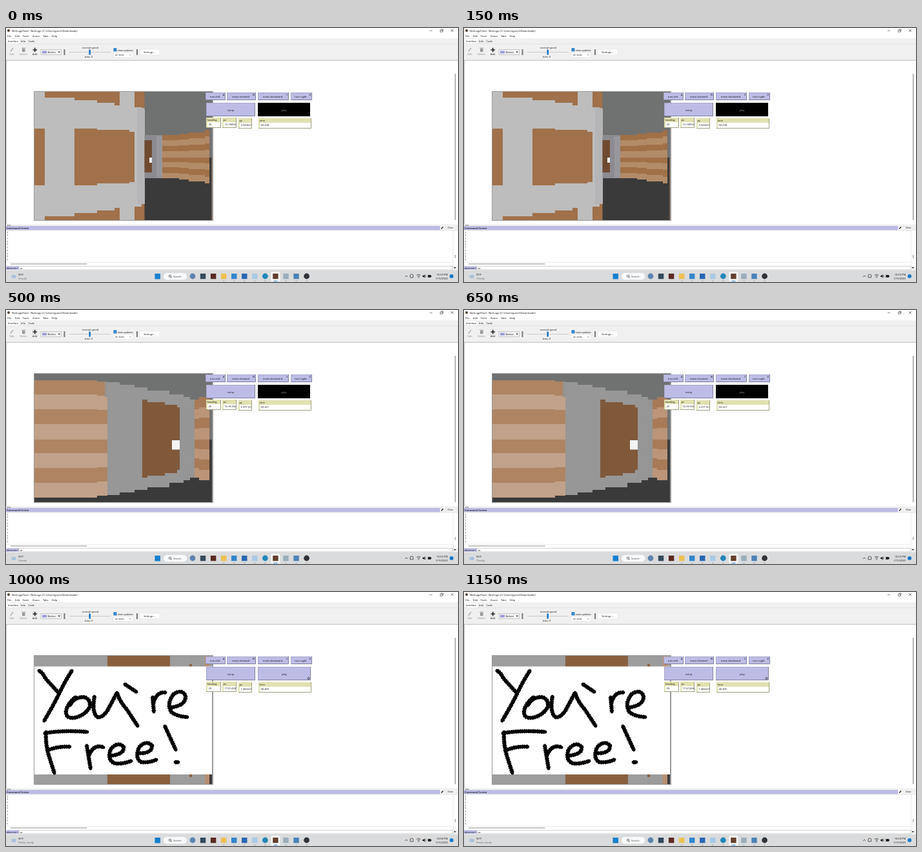
These frames come from a looping animation (700 px wide and 394 px high, 1250 ms). An HTML page:

```html
<!DOCTYPE html>
<html lang="en">
<head>
<meta charset="utf-8">
<title>Maze walk</title>
<style>
html, body { margin: 0; width: 100%; height: 100%; overflow: hidden; background: #fff; }
svg { display: block; width: 700px; height: 394px; font-family: "Open Sans", "Noto Sans", sans-serif; }
text { white-space: pre; }
</style>
</head>
<body>
<svg id="stage" viewBox="0 0 700 394" xmlns="http://www.w3.org/2000/svg">
  <defs>
    <clipPath id="view"><rect x="44" y="99" width="275" height="199"/></clipPath>
    <pattern id="grain" width="3" height="3" patternUnits="userSpaceOnUse">
      <path d="M0 .5h1M2 2.5h1" stroke="#707070" opacity=".2"/>
    </pattern>
  </defs>
  <g id="chrome"></g>
  <g id="frame"></g>
  <g id="world" clip-path="url(#view)"></g>
  <g id="widgets"></g>
  <g id="status"></g>
</svg>
<script>
const STEP = 250;
const HORIZON = 199.5;
const LAVENDER = '#bcbce6';
const CRISP = 'shape-rendering="crispEdges"';
const MID = 'text-anchor="middle"';
const END = 'text-anchor="end"';
const layer = id => document.getElementById(id);

const rect = (x, y, x2, y2, fill, extra = '') =>
  `<rect x="${x}" y="${y}" width="${x2 - x}" height="${y2 - y}" fill="${fill}" ${extra}/>`;
const line = (d, color = '#222', width = 0.7, extra = '') =>
  `<path d="${d}" fill="none" stroke="${color}" stroke-width="${width}" ${extra}/>`;
const dot = (x, y, r, fill) => `<circle cx="${x}" cy="${y}" r="${r}" fill="${fill}"/>`;
const label = (x, y, text, size = 4.1, fill = '#111', extra = '') =>
  `<text x="${x}" y="${y}" font-size="${size}" fill="${fill}" ${extra}>${text}</text>`;

// spans: x, half height, x, half height, ..., end x. Two colours make eight stripes.
function wall(spans, ...colors) {
  const rows = colors.length > 1 ? 8 : 1;
  let out = '';
  for (let i = 0; i + 2 < spans.length; i += 2) {
    const [x, half, end] = spans.slice(i, i + 3);
    const edge = k => rows === 8 && k === 4 ? HORIZON + 1.5 : HORIZON + half * (2 * k / rows - 1);
    for (let k = 0; k < rows; k++) {
      out += rect(x, edge(k), end, edge(k + 1), colors[k % colors.length], CRISP);
    }
  }
  return out;
}

const room = rect(44, 99, 319, 201, '#707171') + rect(44, 201, 319, 299, '#3a3a3a');

function corridor() {
  const wood = '#a0714a', stone = '#bdbdbd';
  return room
    + rect(44, 99, 214.5, 298, wood)
    + wall([44, 101, 60, 92, 106, 87.5, 141, 83.5, 168, 79.5, 176, 101, 199, 77, 210, 73, 214.5], stone)
    + rect(203, 124, 214.5, 273, '#b5b5b7')
    + wall([44, 44, 60], wood)
    + wall([106, 44, 141, 41.5, 191, 39, 199], wood)
    + rect(214.5, 166, 242, 233, '#8b8b91') + rect(233, 168, 242, 232, '#97979c')
    + rect(214.5, 174, 226, 224, '#704a30') + rect(222, 201, 226, 209, '#f2f2f2')
    + wall([242, 33.5, 268, 35.5, 283, 38, 308, 41.5, 315], '#a07047', '#b28b68')
    + rect(318, 201, 319, 298, '#77533f');
}

function hall() {
  return room
    + wall([44, 48, 79, 45, 149], '#a27149', '#ba9272')
    + wall([149, 44, 160, 41.5, 172, 39, 200, 36.5, 226], '#8d8d8d')
    + rect(149, 158, 168, 240, 'url(#grain)')
    + rect(168, 166, 172, 232, '#624422')
    + rect(172, 170, 207, 229, '#744c2e', 'stroke="#6f5a25" stroke-width=".5"')
    + rect(198.5, 201, 207, 209, '#e8e5e2')
    + wall([226, 36.5, 241, 38, 258, 41, 271, 44, 296, 47.5, 315], '#a47148', '#b58c69');
}

function approach() {
  return room
    + wall([44, 91, 141, 88.5, 157], '#ae8462', '#c1a189')
    + rect(153, 111, 157, 135, '#96938f')
    + wall([157, 87.5, 176, 83.5, 199, 79.5, 219, 75, 253, 68.5, 275, 64.5, 285, 60.5, 292], '#979797')
    + rect(269, 137, 292, 262, 'url(#grain)')
    + wall([211, 60.5, 219, 57, 246, 53, 265, 48.5, 269], '#80593a')
    + rect(257, 202, 269, 216.5, '#f3f3f3')
    + wall([292, 60.5, 299, 64.5, 315], '#a87a57', '#bc9578');
}

function doorway() {
  return room
    + rect(44, 99, 134, 200, '#c7ab96') + rect(44, 200, 134, 298, '#b38e6d')
    + wall([44, 83, 134], '#c7ab96')
    + rect(44, 116.5, 134, 158.5, '#b38e6d') + rect(44, 201, 134, 240.5, '#b38e6d')
    + rect(134, 99, 242, 298, '#89603f')
    + rect(222, 201, 242, 232.5, '#050305')
    + rect(242, 99, 315, 298, '#9d9d9d')
    + rect(284, 99, 315, 298, 'url(#grain)')
    + wall([284, 83, 292, 79.5, 304, 75.5, 315], '#895f3e');
}

const lettering = [
  'M51 122Q57 125 61 134L82 157', 'M102 122Q91 139 83 156T59 200',
  'M108 163Q96 172 93 184Q92 197 106 195Q122 192 130 178Q131 165 120 163Q105 163 99 176',
  'M137 162Q133 184 140 193Q147 198 157 184L172 156Q176 170 187 182L204 208',
  'M184 143L202 155', 'M227 163L229 186M228 173Q233 154 247 156',
  'M256 179Q279 176 278 161Q273 150 260 158Q248 173 256 186Q264 193 281 194',
  'M62 217Q61 238 67 256L75 281', 'M60 219Q88 214 126 217', 'M64 246Q79 239 99 240',
  'M125 238L131 274M128 254Q136 235 151 241',
  'M161 254Q184 252 182 240Q173 231 162 244Q156 261 169 266Q181 267 194 262',
  'M204 250Q227 251 226 238Q217 229 206 241Q199 259 210 264Q222 265 233 260',
  'M246 208L263 245', 'M262 264L267 264'
].join('');

function ending() {
  const round = 'stroke-linejoin="round"';
  return rect(44, 99, 319, 298, '#9d9d9d')
    + rect(157, 99, 254, 298, '#89603f')
    + rect(284, 99, 308, 298, 'url(#grain)') + rect(284, 112, 288, 287, '#89603f')
    + rect(308, 99, 315, 298, '#b88e70') + rect(315, 201, 319, 298, '#3a3a3a')
    + rect(44, 115.5, 319, 283, '#fff')
    + line(lettering, '#000', 4.8, 'stroke-linecap="round" ' + round)
    + line(lettering, '#000', 6.4, 'stroke-dasharray="2.6 .9 1.7 1.4" ' + round);
}

const moments = [
  { draw: corridor, heading: 39, px: '15.18056', py: '3.929625', time: '60.238' },
  { draw: hall, heading: 39, px: '15.69485', py: '2.929625', time: '63.665' },
  { draw: approach, heading: 25, px: '16.95106', py: '2.371169', time: '69.321' },
  { draw: doorway, heading: 25, px: '17.42478', py: '2.117596', time: '75.962' },
  { draw: ending, heading: 39, px: '17.61438', py: '1.460225', time: '40.405', idle: true }
];

// One-pixel shade along the bottom and right edges.
const shade = (x, y, x2, y2, color) => line(`M${x} ${y2 - 0.5}H${x2 - 0.5}V${y}`, color, 1);

function button(x, y, x2, y2, text, key = '') {
  return rect(x, y, x2, y2, LAVENDER)
    + line(`M${x + 0.5} ${y2}V${y + 0.5}H${x2}`, '#a9a9c9', 1)
    + shade(x, y, x2, y2, '#82829c')
    + label((x + x2) / 2 - (key ? 1 : 0), (y + y2) / 2 + 2.3, text, 4.1, '#111', MID)
    + label(x2 - 1.8, y + 4.6, key, 3.8, '#111', END);
}

function playButton(idle) {
  if (!idle) return rect(390, 116, 471, 137, '#000', CRISP) + label(430.5, 128.8, 'play', 4.1, '#999', MID);
  return button(390, 116, 472, 137, 'play')
    + '<circle cx="468.5" cy="134" r="1.5" fill="none" stroke="#222" stroke-width=".8"/>';
}

function monitor(x, y, x2, name, value) {
  return rect(x, y, x2, y + 16, '#e1e1b0')
    + shade(x, y, x2, y + 16, '#a0a080')
    + label(x + 1.5, y + 5, name, 4)
    + `<svg x="${x + 2}" y="${y + 7}" width="${x2 - x - 3}" height="8">`
    + rect(0, 0, x2 - x - 3, 8, '#fff') + label(1.5, 5, value, 4.1) + '</svg>';
}

function widgets(m) {
  return button(309, 100, 340, 112, 'turn-left', 'A')
    + button(342, 100, 387, 112, 'move-forward', 'W')
    + button(390, 100, 438, 112, 'move-backward', 'S')
    + button(441, 100, 474, 112, 'turn-right', 'D')
    + button(310, 116, 386, 137, 'setup')
    + playButton(m.idle)
    + monitor(310, 139, 333, 'heading', m.heading)
    + monitor(335, 139, 357, 'px', m.px)
    + monitor(360, 140, 381, 'py', m.py)
    + monitor(391, 140, 473, 'time', m.time);
}

function status(m) {
  return label(19, 384.3, '90°F', 4) + label(19, 390.3, m.idle ? 'Partly cloudy' : 'Cloudy', 4, '#666')
    + label(684, 383.8, m.idle ? '10:30 PM' : '10:33 PM', 4, '#111', END)
    + label(684, 389.8, '1/15/2023', 4, '#111', END);
}

function toolbar() {
  const menu = [[2, 'File'], [14, 'Edit'], [25.5, 'Tools'], [41, 'Zoom'], [57, 'Tabs'], [70.5, 'Help']];
  return rect(0, 0, 700, 394, '#fff')
    + dot(4, 4, 2, '#51402f')
    + label(9, 6, 'NetLogoFinal - NetLogo {C:\\Users\\guest\\Downloads}', 4.2)
    + line('M656 4.2h4M672.5 3.2h3v3h-3zM674 3v-1h3v3h-1M689 2l4 4M693 2l-4 4', '#333', 0.6)
    + menu.map(([x, text]) => label(x, 14, text)).join('')
    + rect(0, 16, 700, 50, '#f0f0f0') + rect(1, 17, 21, 24.5, '#fff')
    + line('M0 24.5H700', '#dcdcdc', 0.6)
    + label(3, 22.2, 'Interface', 3.9) + label(23, 22.2, 'Info', 3.9) + label(34.5, 22.2, 'Code', 3.9)
    + line('M7 36.5l4-5.5', '#999', 1.2)
    + rect(25, 32, 29.5, 37, '#999') + line('M24 31h6.5', '#999', 0.8)
    + line('M41.5 34h6.5M44.75 30.8v6.5', '#222', 1.6)
    + label(9, 42.2, 'Edit', 3.9, '#888', MID) + label(27, 42.2, 'Delete', 3.9, '#888', MID)
    + label(44.7, 42.2, 'Add', 3.9, '#111', MID)
    + rect(54, 33.3, 85.5, 41.7, '#f2f2f2', 'stroke="#aaa" stroke-width=".6"')
    + rect(56, 35.5, 63, 39.5, '#9d9ddb') + label(64.5, 38.9, 'Button', 3.9)
    + '<path d="M80.5 36.5h3.4l-1.7 2.2z" fill="#333"/>'
    + rect(89.5, 33, 91.5, 42, '#777') + rect(202, 33, 204, 42, '#777')
    + label(130.5, 31.5, 'normal speed', 3.9, '#111', MID)
    + line('M98 37.5H162', '#bbb', 0.7) + rect(128.5, 33.5, 131, 41.5, '#1674c4')
    + label(128, 46, 'ticks: 0', 3.9, '#111', MID)
    + rect(166.5, 31.2, 171.5, 36.2, '#1674c4', 'rx=".8"') + line('M167.7 33.7l1 1 1.8-2', '#fff', 0.6)
    + label(173, 35.6, 'view updates', 3.9)
    + rect(166.5, 38, 196, 45.5, '#fff', 'stroke="#ddd" stroke-width=".5"')
    + label(169, 43.2, 'on ticks', 3.9) + line('M191 41l1.3 1.3 1.3-1.3', '#333', 0.5)
    + rect(207, 33, 238, 41.8, '#fff', 'stroke="#ddd" stroke-width=".5"')
    + label(222, 38.8, 'Settings...', 3.9, '#111', MID)
    + line('M0 50.2H700', '#aaa', 0.8) + line('M.6 50V306', '#aaa', 0.7)
    + line('M695.7 71V298', '#8b8b8b', 1.2);
}

function commandCenter() {
  let out = rect(0, 304.5, 700, 314, '#f0f0f0') + line('M2 306h2M5 306h2', '#444', 1)
    + rect(0, 307, 672, 313.5, LAVENDER)
    + label(1, 311.8, 'Command Center', 4.1, '#111', 'font-weight="600"')
    + line('M674 311.5l3-3', '#222', 1.2) + label(684, 311.3, 'Clear', 3.5)
    + line('M0 314.2H700M692.5 314V369M0 363.5H692', '#ddd', 0.6)
    + line('M695.7 352V357', '#777', 0.9) + line('M7 366H125.5', '#8b8b8b', 1.2);
  for (let i = 0; i < 10; i++) out += label(1.5, 318.6 + i * 4.7, '1', 3.9);
  return out + rect(0, 369, 700, 376, '#f0f0f0') + rect(0, 369.5, 20, 375, LAVENDER)
    + rect(20, 369.5, 692, 375, '#fff', 'stroke="#aaa" stroke-width=".5"')
    + label(0.7, 373.6, 'observer&gt;', 3.9) + label(21.5, 373.6, 'ca', 3.9)
    + '<path d="M693.5 371h3.4l-1.7 2.3z" fill="#222"/>';
}

function taskbar() {
  const icons = ['#5d83b0', '#34495c', '#5a2a22', '#edc052', '#3286cc', '#2866b2',
    '#a9c9e5', '#2386b8', '#63402d', '#9aadba', '#4b83b8', '#303338'];
  const round = [0, 7, 11];
  const active = 8;
  const drawIcon = (color, i) => {
    const x = 289 + 16.05 * i;
    const half = i === active ? 3 : 1.2;
    const plate = i === active ? rect(x - 7, 378, x + 7, 393, '#f4f5f6', 'rx="1.5"') : '';
    const mark = round.includes(i) ? dot(x, 385, 4.4, color) : rect(x - 4.2, 381, x + 4.2, 389.3, color);
    const under = i > 2 ? rect(x - half, 392, x + half, 392.8, i === active ? '#1680cf' : '#999') : '';
    return plate + mark + under;
  };
  return rect(0, 376, 700, 394, '#dadbdc')
    + dot(10, 385, 2.2, '#b9cbdc') + dot(13, 385.5, 2.5, '#a2bdd8') + rect(9, 385, 15, 388, '#a8c1da', 'rx="1.5"')
    + rect(230.5, 381, 239, 389.5, '#1680cf')
    + rect(244, 380, 280, 390.5, '#f8f9fa', 'rx="5"')
    + '<circle cx="254" cy="384.8" r="1.7" fill="none" stroke="#333" stroke-width=".7"/>'
    + line('M255.2 386l1.7 1.7') + label(259, 386.8, 'Search', 4.1, '#444')
    + icons.map(drawIcon).join('')
    + line('M618 386l2-2 2 2')
    + line('M626 387v-4q2.5-2 4.5 0v4zM636 383.5q3-2.5 6 0M637.2 385.3q1.8-1.5 3.6 0')
    + dot(639, 387, 0.7, '#222')
    + '<path d="M645 384h1.5l2-1.7v5.4l-2-1.7H645z" fill="#222"/>' + line('M649.5 383.3q1.5 1.7 0 3.4')
    + rect(653.3, 383, 658, 387, '#222', 'rx=".7"') + rect(658, 384.2, 659, 385.8, '#222')
    + dot(690, 385, 3, '#147acb');
}

layer('chrome').innerHTML = toolbar() + commandCenter() + taskbar();
layer('frame').innerHTML = rect(43, 98, 321, 299, '#9a9a9a', CRISP);

let shown = -1;
function render(ms) {
  const index = Math.floor(ms / STEP) % moments.length;
  if (index === shown) return;
  shown = index;
  const moment = moments[index];
  layer('world').innerHTML = moment.draw();
  layer('widgets').innerHTML = widgets(moment);
  layer('status').innerHTML = status(moment);
}

const start = performance.now();
function tick() {
  render(performance.now() - start);
  requestAnimationFrame(tick);
}
tick();
</script>
</body>
</html>
```
